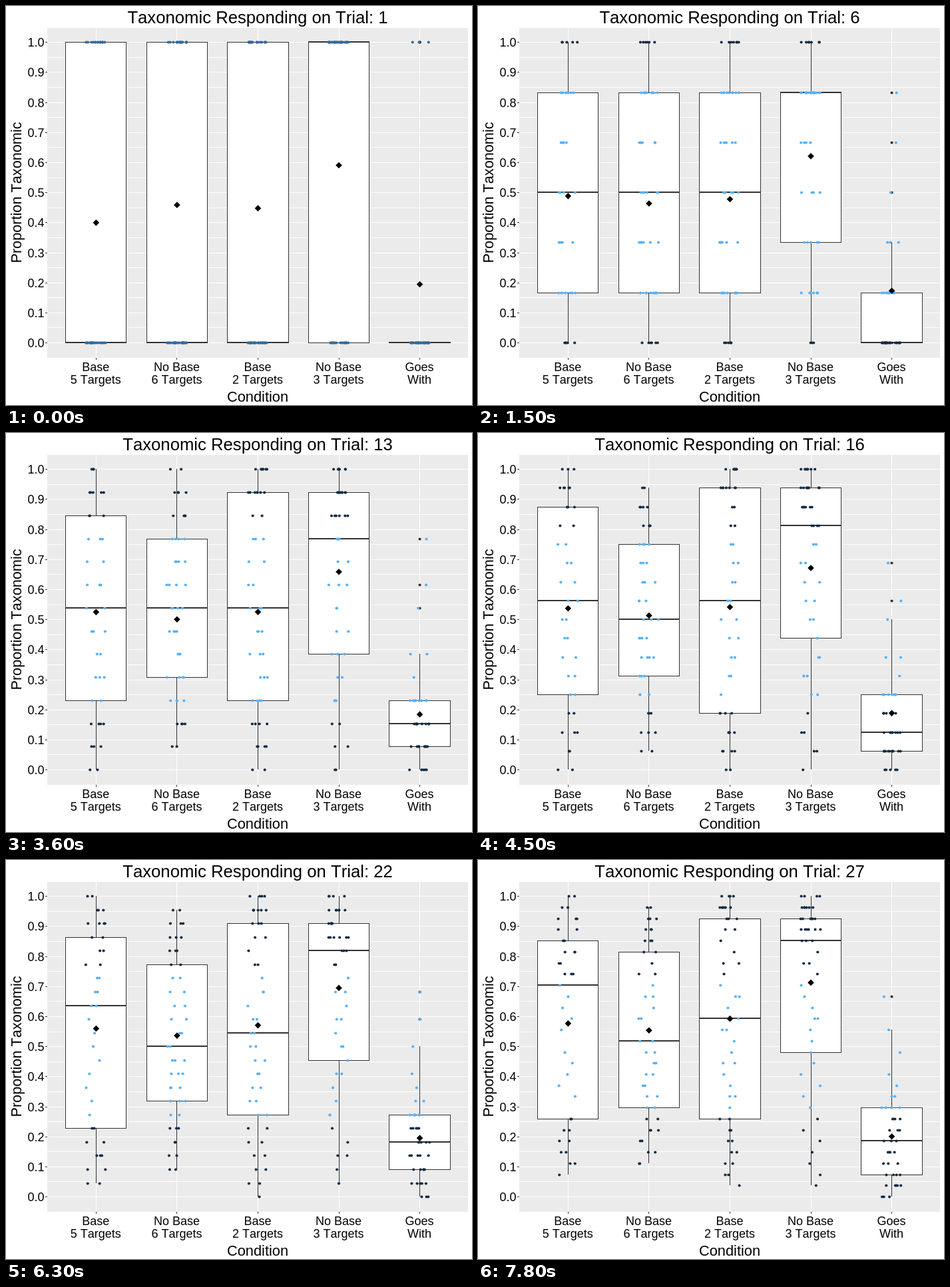
Animation, 700 px wide and 600 px high, one loop 8 s. Source, as an HTML page with a canvas:

```html
<!DOCTYPE html>
<html lang="en">
<head>
<meta charset="utf-8">
<title>Taxonomic Responding</title>
<style>
html, body { margin: 0; width: 100%; height: 100%; overflow: hidden; background: #fff; }
canvas { display: block; }
</style>
</head>
<body>
<canvas id="stage" width="700" height="600"></canvas>
<script>
const ctx = document.getElementById('stage').getContext('2d');
const STEP = 300, LOOP = 8000, SETTLED = 4, TRIALS = 27;
const FONT = '"Liberation Sans", Arial, sans-serif';
const INK = '#333333', DARK = '#132B43', LIGHT = '#56B1F7', MID = '#336A98';

// mean: on the first, the settled and the last trial
// from, to: lowest score, three quartiles and highest score, early and late
const groups = [
  { label: ['Base', '5 Targets'], size: 40, skew: 1, mean: [.4, .469, .577],
    from: [-.05, .24, .42, .81, 1], to: [.06, .245, .69, .866, 1] },
  { label: ['No Base', '6 Targets'], size: 48, skew: 1, mean: [.459, .444, .554],
    from: [.02, .23, .49, .74, 1], to: [.11, .314, .51, .8, .95] },
  { label: ['Base', '2 Targets'], size: 49, skew: 1, mean: [.448, .453, .593],
    from: [-.05, .12, .495, .9, 1], to: [.02, .275, .575, .92, 1] },
  { label: ['No Base', '3 Targets'], size: 49, skew: 1, mean: [.591, .601, .713],
    from: [-.05, .36, .73, .9, 1], to: [.04, .48, .85, .92, 1] },
  { label: ['Goes', 'With'], size: 41, skew: 3, mean: [.195, .167, .201],
    from: [0, .02, .05, .24, .8], to: [0, .085, .19, .29, .67] }
];

const lerp = (a, b, f) => a + (b - a) * f;
const yOf = v => 506.05 - 451.8 * v;
const xOf = i => 134.85 + 121.552 * i;
const progress = n => Math.max(0, (n - SETTLED) / (TRIALS - SETTLED)) ** .7;

function random(a, b, c) {
  const s = Math.sin(a * 127.1 + b * 311.7 + c * 74.7) * 43758.5453;
  return s - Math.floor(s);
}

// Two-sided binomial test against one half
function significant(count, n) {
  let term = 1, sum = 0;
  for (let k = 0; k <= Math.min(count, n - count); k++) {
    sum += term;
    term *= (n - k) / (k + 1);
  }
  return 2 * sum / 2 ** n < .05;
}

function dotColor(count, n) {
  return n < 6 ? MID : significant(count, n) ? DARK : LIGHT;
}

function meanOf({ mean: [first, settled, last] }, n) {
  return n < SETTLED
    ? lerp(first, settled, (n - 1) / (SETTLED - 1))
    : lerp(settled, last, progress(n));
}

// Lowest score, quartiles and highest score as whole counts out of n
function marksOf(g, n) {
  return g.from.map((v, j) => Math.round(n * lerp(v, g.to[j], progress(n))));
}

// Scores spread evenly between the marks; skew thins out the upper tail
function scoresOf(g, marks) {
  return Array.from({ length: g.size }, (_, i) => {
    const u = 4 * i / (g.size - 1), part = Math.min(3, Math.floor(u));
    const f = (u - part) ** (part === 3 ? g.skew : 1);
    return Math.round(lerp(marks[part], marks[part + 1], f));
  });
}

function rect(x, y, w, h, color) {
  ctx.fillStyle = color;
  ctx.fillRect(Math.round(x), Math.round(y), w, h);
}

function dot(x, y, color) {
  ctx.fillStyle = color;
  ctx.beginPath();
  ctx.arc(x, y, 2.1, 0, 7);
  ctx.fill();
}

function diamond(x, y) {
  const r = 4.8;
  ctx.fillStyle = '#000';
  ctx.beginPath();
  ctx.moveTo(x - r, y);
  ctx.lineTo(x, y - r);
  ctx.lineTo(x + r, y);
  ctx.lineTo(x, y + r);
  ctx.fill();
}

function text(str, x, y, size, align = 'center') {
  ctx.font = `${size}px ${FONT}`;
  ctx.textAlign = align;
  ctx.fillStyle = '#000';
  ctx.fillText(str, x, y);
}

function drawAxes(n) {
  rect(0, 0, 700, 600, '#fff');
  rect(62, 33, 632, 496, '#EBEBEB');
  for (let i = 0; i <= 20; i++) {
    const y = Math.round(yOf(i / 20));
    rect(62, y, 632, 1, '#fff');
    if (i % 2) continue;
    rect(59, y, 3, 1, INK);
    text((i / 20).toFixed(1), 57.5, y + 7, 18, 'right');
  }
  groups.forEach((g, i) => {
    rect(xOf(i), 33, 1, 496, '#fff');
    rect(xOf(i), 529, 1, 3, INK);
    g.label.forEach((line, j) => text(line, xOf(i), 549 + 19 * j, 18));
  });
  text('Taxonomic Responding on Trial: ' + n, 378, 26, 25.7);
  text('Condition', 378, 595, 21.8);
  ctx.save();
  ctx.translate(22.5, 280.5);
  ctx.rotate(-Math.PI / 2);
  text('Proportion Taxonomic', 0, 0, 21.7);
  ctx.restore();
}

function drawGroup(g, i, n) {
  const x = xOf(i), at = count => Math.round(yOf(count / n));
  const marks = marksOf(g, n), scores = scoresOf(g, marks);
  const [, q1, median, q3] = marks;
  const reach = 1.5 * (q3 - q1);
  const isOutlier = c => c > q3 + reach || c < q1 - reach;
  const inner = scores.filter(c => !isOutlier(c));
  const high = at(Math.max(...inner)), low = at(Math.min(...inner));
  const top = at(q3), bottom = at(q1);
  const left = Math.round(x - 45.6), width = Math.round(x + 45.6) - left + 1;

  rect(x, high, 1, low - high, INK);
  rect(left, top, width, bottom - top + 1, INK);
  if (bottom > top) rect(left + 1, top + 1, width - 2, bottom - top - 1, '#fff');
  rect(left, at(median) - 1, width, 2, INK);

  scores.filter(isOutlier).forEach(c => dot(x + .5, at(c) + .5, INK));
  scores.forEach((c, k) =>
    dot(x + 30 * random(n, i + 1, k + 1) - 15, at(c) + .5, dotColor(c, n)));
  diamond(x + .5, yOf(meanOf(g, n)) + .5);
}

function frame(now) {
  const n = Math.min(TRIALS, Math.floor(now % LOOP / STEP) + 1);
  ctx.fontKerning = 'none';
  drawAxes(n);
  groups.forEach((g, i) => drawGroup(g, i, n));
  requestAnimationFrame(frame);
}
requestAnimationFrame(frame);
</script>
</body>
</html>
```
